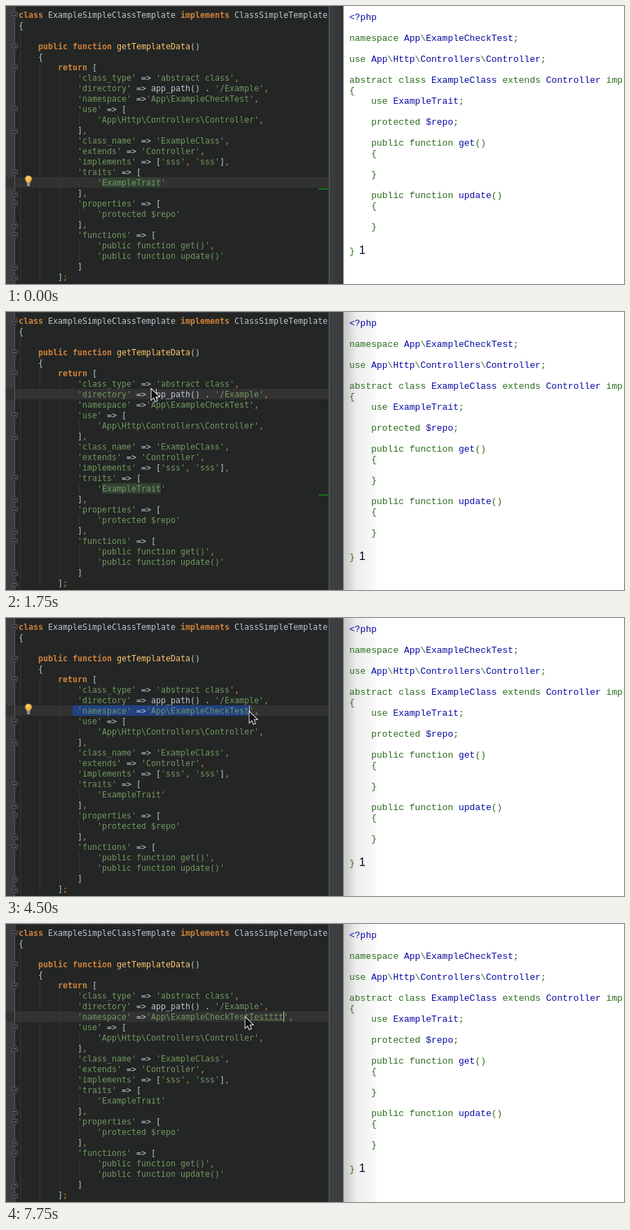
Recreate the animation shown at these times as an HTML page with a canvas. Size 882 by 398 pixels, loop 8 s.

```html
<!DOCTYPE html>
<html lang="en">
<head>
<meta charset="utf-8">
<style>
html, body { margin: 0; width: 100%; height: 100%; overflow: hidden; background: #fff; }
canvas { display: block; }
</style>
</head>
<body>
<canvas id="stage" width="882" height="398"></canvas>
<script>
const ctx = document.getElementById('stage').getContext('2d');
const LOOP = 8000, STEP = 250;
const LEFT = 18, COL = 7, ROW = 15;
const EDITOR_FONT = '11.63px "DejaVu Sans Mono", monospace';
const OUTPUT_FONT = '13px "Liberation Mono", monospace';

const source = typed => String.raw`class ExampleSimpleClassTemplate implements ClassSimpleTemplate
{

    public function getTemplateData()
    {
        return [
            'class_type' => 'abstract class',
            'directory' => app_path() . '/Example',
            'namespace' =>'App\ExampleCheckTest${typed}',
            'use' => [
                'App\Http\Controllers\Controller',
            ],
            'class_name' => 'ExampleClass',
            'extends' => 'Controller',
            'implements' => ['sss', 'sss'],
            'traits' => [
                'ExampleTrait'
            ],
            'properties' => [
                'protected $repo'
            ],
            'functions' => [
                'public function get()',
                'public function update()'
            ]
        ];
    }`.split('\n');

const output = String.raw`<?php

namespace App\ExampleCheckTest;

use App\Http\Controllers\Controller;

abstract class ExampleClass extends Controller implements
{
    use ExampleTrait;

    protected $repo;

    public function get()
    {

    }

    public function update()
    {

    }`.split('\n');

const editorRules = [
  [/^'[^']*'/, '#72985f'],
  [/^(class|implements|public|function|return)\b/, '#d0803a', 'bold '],
  [/^getTemplateData/, '#ffc66d'],
  [/^[,;]/, '#d0803a'],
  [/^(\w+|\s+|.)/, '#bcc6d0']
];
const outputRules = [
  [/^<\?php/, '#0a0aa4'],
  [/^(namespace|use|abstract|class|extends|implements|protected|public|function)\b/, '#2a6e1c'],
  [/^\$?\w+/, '#0a0aa4'],
  [/^(\s+|.)/, '#2a6e1c']
];

// Pointer position at each step, starting with step 1
const pointer = [
  [716, 2], [680, 26], [610, 68], [537, 97], [327, 106], [222, 108], [207, 110],
  [207, 110], [160, 109], [104, 109], [97, 128], [196, 130], [287, 131], [330, 133],
  [347, 134], [347, 134], [347, 134], [347, 134], [349, 139], [345, 135], [341, 133]
];
const foldsDown = [0, 3, 5, 9, 15, 18, 21], foldsUp = [11, 17, 20, 24, 25];
const guides = [[0, 2, 27], [4, 5, 26], [8, 6, 25], [12, 10, 11], [12, 16, 17], [12, 19, 20], [12, 22, 24]];

const colX = col => LEFT + col * COL;
const rowY = row => 5 + row * ROW;

function rect(color, x, y, w, h) {
  ctx.fillStyle = color;
  ctx.fillRect(x, y, w, h);
}

function mark(color, row, from, to) {
  rect(color, colX(from), rowY(row), (to - from) * COL, ROW);
}

function shade(x0, x1, from, to) {
  const g = ctx.createLinearGradient(x0, 0, x1, 0);
  g.addColorStop(0, from);
  g.addColorStop(1, to);
  rect(g, x0, 0, x1 - x0, 398);
}

function path(points, x, y, fill, stroke, width = 1, flip = 1) {
  ctx.beginPath();
  points.forEach(([px, py]) => ctx.lineTo(x + px, y + py * flip));
  ctx.closePath();
  ctx.lineWidth = width;
  ctx.strokeStyle = stroke;
  ctx.stroke();
  ctx.fillStyle = fill;
  ctx.fill();
}

function codeLine(text, rules, font, x, y, advance) {
  for (let i = 0; i < text.length;) {
    const rest = text.slice(i);
    const [pattern, color, weight = ''] = rules.find(rule => rule[0].test(rest));
    const token = rest.match(pattern)[0];
    ctx.font = weight + font;
    ctx.fillStyle = color;
    ctx.fillText(token, x + i * advance, y);
    i += token.length;
  }
}

function foldMark(row, flip) {
  const y = 13.5 + row * ROW;
  path([[-4, -4], [4, -4], [4, 1], [0, 4.5], [-4, 1]], 12.5, y, '#313335', '#6c6f71', 1, flip);
  rect('#6c6f71', 10.5, y - .5, 4, 1);
}

function bulb(row) {
  const y = rowY(row);
  ctx.fillStyle = '#f2b54a';
  ctx.beginPath();
  ctx.arc(32, y + 2.5, 4.8, 0, 7);
  ctx.fill();
  rect('#f2b54a', 29.5, y + 5, 5, 3);
  rect('#ffe0a0', 30, y, 2, 3);
  rect('#b9bcbf', 29.5, y + 8.5, 5, 1.2);
  rect('#b9bcbf', 30, y + 10.5, 4, 2);
}

function drawEditor(step) {
  const activeRow = step < 6 ? 16 : step < 11 ? 7 : 8;
  const typedCount = step < 25 ? 0 : step < 30 ? Math.min(step - 24, 4) : step - 24;
  const selectionEnd = [12, 26, 39, 45][step - 11] || 47;
  const caretCol = activeRow === 7 ? 28 : selectionEnd + typedCount;

  rect('#232625', 0, 0, 461, 398);
  rect('#3a3d3f', 0, 0, 12, 398);
  rect('#3c3f41', 0, 0, 461, 1);
  rect('#323232', 0, rowY(activeRow), 460, ROW);
  rect('#55585a', 12, 0, 1, 398);
  guides.forEach(([col, from, to]) => rect('#343837', colX(col) + 2, rowY(from), 1, (to - from) * ROW));
  foldsDown.forEach(row => foldMark(row, 1));
  foldsUp.forEach(row => foldMark(row, -1));

  if (step < 8) {
    mark('#344134', 16, 17, 29);
    rect('#16701c', 446, 261, 14, 2);
  } else if (step < 15) {
    mark('#344134', 7, 27, 35);
    rect('#16701c', 446, 126, 14, 2);
  }
  if (step >= 11 && step < 20) mark('#214283', 8, 11, selectionEnd);

  source('Testttt'.slice(0, typedCount))
    .forEach((line, row) => codeLine(line, editorRules, EDITOR_FONT, LEFT, 17 + row * ROW, COL));

  if (step === 31) {
    ctx.strokeStyle = '#5c8a52';
    ctx.lineWidth = 1;
    ctx.beginPath();
    for (let x = colX(47); x <= colX(54); x += 2) ctx.lineTo(x, 137.5 + (x % 4 < 2 ? 1 : -1));
    ctx.stroke();
  }
  if (step >= 6) rect('#c8c8c8', colX(caretCol), rowY(activeRow), 1, ROW);
  if (step < 6) bulb(16);
  if (step >= 18 && step < 20 || step >= 23 && step < 25) bulb(8);

  rect('#3c3f41', 460, 0, 22, 398);
  rect('#55585a', 461, 0, 1, 398);
}

function drawOutput(step) {
  rect('#fff', 482, 0, 400, 398);
  if (step < 6) shade(462, 482, 'rgba(0,0,0,0)', 'rgba(0,0,0,.2)');
  else {
    shade(482, 529, 'rgba(0,0,0,.1)', 'rgba(0,0,0,.02)');
    shade(482, 500, 'rgba(0,0,0,.14)', 'rgba(0,0,0,0)');
  }
  rect('#808080', 481, 0, 1, 398);
  output.forEach((line, row) => codeLine(line, outputRules, OUTPUT_FONT, 490, 20 + row * ROW, 7.8));
  codeLine('}', outputRules, OUTPUT_FONT, 490, 355, 7.8);
  ctx.font = '16px "Liberation Sans", sans-serif';
  ctx.fillStyle = '#000028';
  ctx.fillText('1', 504, 355);
}

function drawPointer(step) {
  if (!step) return;
  const [x, y] = pointer[Math.min(step, pointer.length) - 1];
  path([[0, 0], [0, 15], [3.4, 11.8], [5.8, 17.3], [8.2, 16.2], [5.9, 11], [10.6, 10.6]], x + .5, y + .5, '#111', '#fff', 1.8);
}

function frame(now) {
  const step = Math.floor(now % LOOP / STEP);
  drawEditor(step);
  drawOutput(step);
  drawPointer(step);
  requestAnimationFrame(frame);
}
requestAnimationFrame(frame);
</script>
</body>
</html>
```
